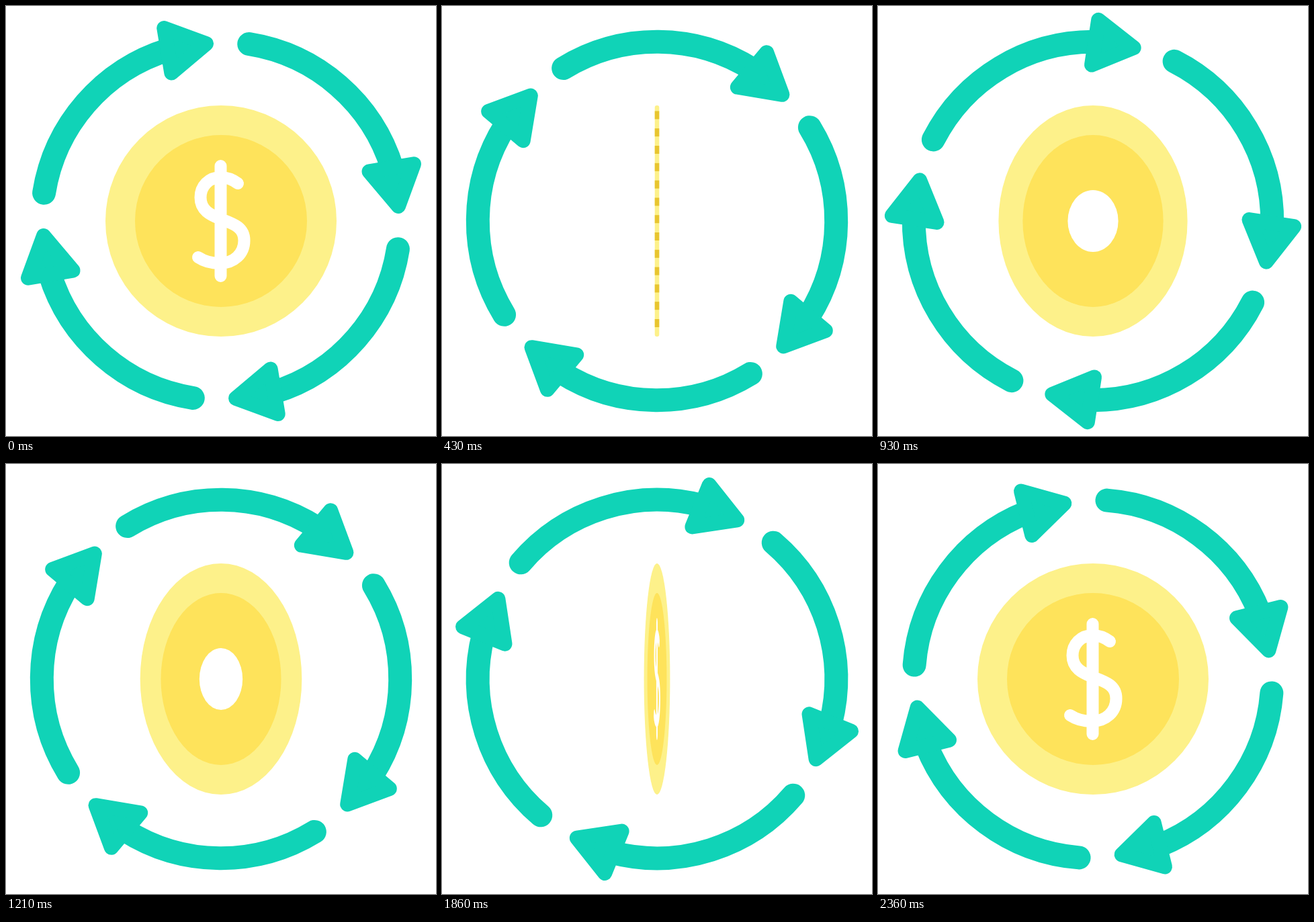
Write an HTML page with a canvas that moves like this. It is 640 by 640 pixels and loops after 2430 ms.

```html
<!DOCTYPE html>
<html lang="en">
<head>
<meta charset="utf-8">
<title>Coin exchange</title>
<style>
  html, body { margin: 0; width: 100%; height: 100%; overflow: hidden; background: #fff; }
  canvas { display: block; width: 640px; height: 640px; }
</style>
</head>
<body>
<canvas id="stage" width="640" height="640"></canvas>
<script>
const ctx = document.getElementById('stage').getContext('2d');
const LOOP = 2430, LAST = 33, FLIP = 11;
const TEAL = '#10d3b7', PALE = '#fdf18a', GOLD = '#fee35b', DARK = '#e8c52f';
const rad = deg => deg * Math.PI / 180;

const head = new Path2D('M220.5 -73.7 L287 -84.7 L264 -22 Z');
const dollar = new Path2D(
  'M-.5 -82 V82 M25 -56 C17 -62 8 -65 -.5 -65 C-18 -65 -30.5 -52 -30.5 -35 ' +
  'C-30.5 -16 -16 -9 -.5 -3 C18 4 34.5 9 34.5 29 C34.5 49 19 63 -2 63 C-14 63 -25 60 -34 54');

function ease(x) {
  x = Math.min(1, Math.max(0, x / FLIP));
  return x * x * (3 - 2 * x);
}

// Coin width from 0 to 1 at tick k (25 ticks per second)
function coinWidth(k) {
  return k < 27
    ? Math.max(1 - ease(k), ease(k - 16))
    : Math.max(1 - ease(k - 27), ease(k - 44.7));
}

function disc(r, color) {
  ctx.fillStyle = color;
  ctx.beginPath();
  ctx.arc(0, 0, r, 0, 2 * Math.PI);
  ctx.fill();
}

function drawArrow() {
  ctx.strokeStyle = ctx.fillStyle = TEAL;
  ctx.lineWidth = 35;
  ctx.beginPath();
  ctx.arc(0, 0, 266.7, rad(-81), rad(-17));
  ctx.stroke();
  ctx.lineWidth = 22;
  ctx.fill(head);
  ctx.stroke(head);
}

function drawEdge() {
  ctx.fillStyle = PALE;
  ctx.beginPath();
  ctx.roundRect(-3.3, -172, 6.6, 344, 3);
  ctx.fill();
  ctx.fillStyle = DARK;
  for (let i = 0; i < 13; i++) ctx.fillRect(-3.3, -163.6 + i * 25.8, 6.6, 12);
}

function drawCoin(k) {
  const w = coinWidth(k);
  if (w < 0.02) return drawEdge();
  ctx.save();
  ctx.scale(w, 1);
  disc(172, PALE);
  disc(128, GOLD);
  if (k > 13 && k < 41) {
    disc(46, '#fff');
  } else {
    ctx.strokeStyle = '#fff';
    ctx.lineWidth = 18;
    ctx.stroke(dollar);
  }
  ctx.restore();
}

function draw(ms) {
  // 14 poses per second on a 10 ms clock
  const t = Math.floor(ms % LOOP / 10) * 10;
  const pose = Math.min(LAST, Math.floor((t + 5) * 14 / 1000));
  const k = Math.ceil(pose * 25 / 14);

  ctx.setTransform(1, 0, 0, 1, 0, 0);
  ctx.fillStyle = '#fff';
  ctx.fillRect(0, 0, 640, 640);
  ctx.translate(320, 320);
  ctx.lineCap = ctx.lineJoin = 'round';
  ctx.save();
  ctx.rotate(rad(4.5 * k));
  for (let i = 0; i < 4; i++) {
    drawArrow();
    ctx.rotate(Math.PI / 2);
  }
  ctx.restore();
  drawCoin(k);
}

const start = performance.now();
function tick() {
  draw(performance.now() - start);
  requestAnimationFrame(tick);
}
tick();
</script>
</body>
</html>
```
